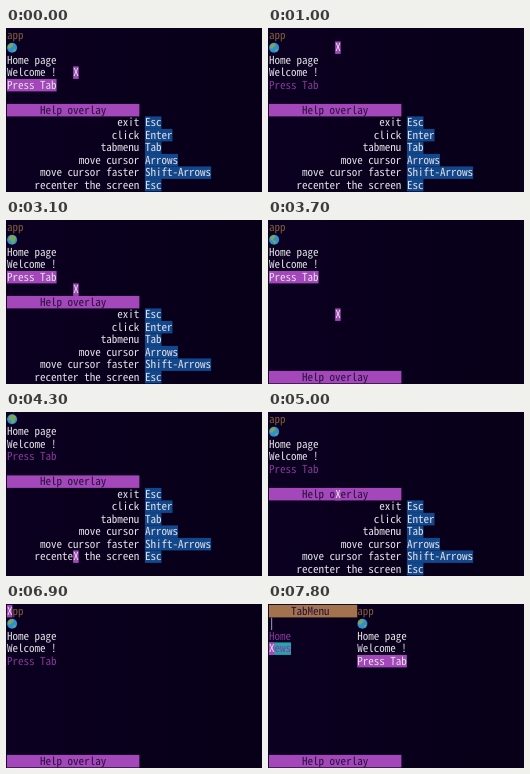
Write an HTML page that moves like this. It is 256 px wide and 164 px high and loops after 8000 ms.

```html
<!DOCTYPE html>
<html lang="en">
<head>
<meta charset="utf-8">
<title>Terminal page</title>
<style>
  html, body { margin: 0; width: 100%; height: 100%; overflow: hidden; background: #08001a; }
  svg { display: block; width: 100vw; height: 100vh; background: linear-gradient(90deg, #0b0020, #070018); }
  text { font-family: "Noto Sans Mono CJK JP", "Noto Sans Mono", monospace; white-space: pre; text-rendering: geometricPrecision; }
</style>
</head>
<body>
<svg id="screen" viewBox="0 0 256 164" preserveAspectRatio="none"></svg>
<script>
const LOOP = 8000, STEP = 100;
const CW = 5.52, RH = 12.5, PAD = 0.9;
const C = {
  fg: '#e2e0e6', ink: '#29103a', purple: '#a347ba', violet: '#84399a',
  blue: '#12488b', brown: '#a2734c', umber: '#80593d', teal: '#2aa1b3'
};
const HELP = [
  ['exit', 'Esc'], ['click', 'Enter'], ['tabmenu', 'Tab'], ['move cursor', 'Arrows'],
  ['move cursor faster', 'Shift-Arrows'], ['recenter the screen', 'Esc']
];

// Cursor legs: start time, first row, last row; one row per step
const LEGS = [
  [0, 3, -3], [600, -3, 5], [1700, 5, 7], [2200, 2, 2], [2600, 2, 5], [3300, 6, 6],
  [3600, 6, 8], [3900, 10, 10], [4100, 11, 11], [4300, 12, 6], [5200, 6, 4],
  [6200, 0, 3], [6900, 0, 0], [7300, 0, 2], [7700, 2, 3]
];
const HELP_CLICKS = [3400, 4300, 5200];
const MENU_KEYS = [6200, 6900, 7000];

// Asia, Africa, Americas on a globe of radius 5
const LAND = [
  'M-4.4 -1.8L-2 -4.2L1 -4.2L1.4 -2L-.6 -.4L-2 1L-4 .4ZM1 2L3.6 1.4L3.4 3.2L1.4 3.6Z',
  'M-2.6 -3.8L.6 -4.8L4 -2.6L3.2 .8L.8 4.2L-.6 3.4L-.8 1.2L-3.6 .4Z',
  'M-4 -2.8L-.8 -4.8L1.6 -3.4L-1.4 .2L2.2 1.8L.6 4.6L-.8 2L-4 -.8Z'
];

const svg = document.getElementById('screen');
const pen = document.createElement('canvas').getContext('2d');
pen.font = '100px "Noto Sans Mono CJK JP", "Noto Sans Mono", monospace';
const size = CW * 100 / pen.measureText('M').width;

const px = col => PAD + col * CW, py = row => PAD + row * RH;
const fill = (col, row, n, color) =>
  `<rect x="${px(col)}" y="${py(row)}" width="${n * CW}" height="${RH}" fill="${color}"/>`;
const write = (col, row, s, color = C.fg, back) => (back ? fill(col, row, s.length, back) : '') +
  `<text x="${px(col)}" y="${py(row) + 9.7}" font-size="${size}" fill="${color}">${s}</text>`;
const globe = (col, row, i) =>
  `<g transform="translate(${px(col) + 5.2} ${py(row) + 6.3})"><circle r="5" fill="#2f8fd4"/>` +
  `<path d="${LAND[i]}" fill="#7da65a"/></g>`;

const odd = (times, t) => times.filter(s => s <= t).length % 2 === 1;

function rowAt(t) {
  const [start, from, to] = LEGS.findLast(leg => leg[0] <= t);
  const moved = Math.min((t - start) / STEP, Math.abs(to - from));
  return from + moved * Math.sign(to - from);
}

function stateAt(time) {
  const t = Math.floor(time / STEP) * STEP, row = rowAt(t), roam = t < 6200;
  return {
    row, col: roam ? 12 : 0,
    scroll: roam ? Math.min(0, row - 1) + Math.max(0, row - 11) : 0,
    open: !odd(HELP_CLICKS, t), menu: odd(MENU_KEYS, t),
    lit: Math.floor((t + 1900) / 1000) % 2 === 1,
    spin: Math.floor((t + 935) * 3 / 1000 + 1) % 3
  };
}

function draw({ row, col, scroll, open, menu, lit, spin }) {
  const left = menu ? 16 : 0, y = r => r - scroll;
  let out = write(left, y(0), 'app', C.umber) + globe(left, y(1), spin) +
    write(left, y(2), 'Home page') + write(left, y(3), 'Welcome !') +
    write(left, y(4), 'Press Tab', lit ? C.fg : C.violet, lit && C.purple);

  const bar = y(open ? 6 : 12);
  out += fill(0, bar, 24, C.purple) + write(6, bar, 'Help overlay', C.ink);
  if (open) HELP.forEach(([name, key], i) => {
    out += write(24 - name.length, bar + 1 + i, name) + write(25, bar + 1 + i, key, C.fg, C.blue);
  });

  if (menu) {
    out += fill(0, 0, 16, C.brown) + write(4, 0, 'TabMenu', C.ink) + write(0, 1, '|');
    ['Home', 'News'].forEach((s, i) => {
      out += write(0, 2 + i, s, C.violet, row === 2 + i && C.teal);
    });
  }
  return out + write(col, y(row), 'X', C.fg, C.purple);
}

let last = '';
function frame(now) {
  const state = stateAt(now % LOOP), key = JSON.stringify(state);
  if (key !== last) {
    svg.innerHTML = draw(state);
    last = key;
  }
  requestAnimationFrame(frame);
}
frame(0);
</script>
</body>
</html>
```
